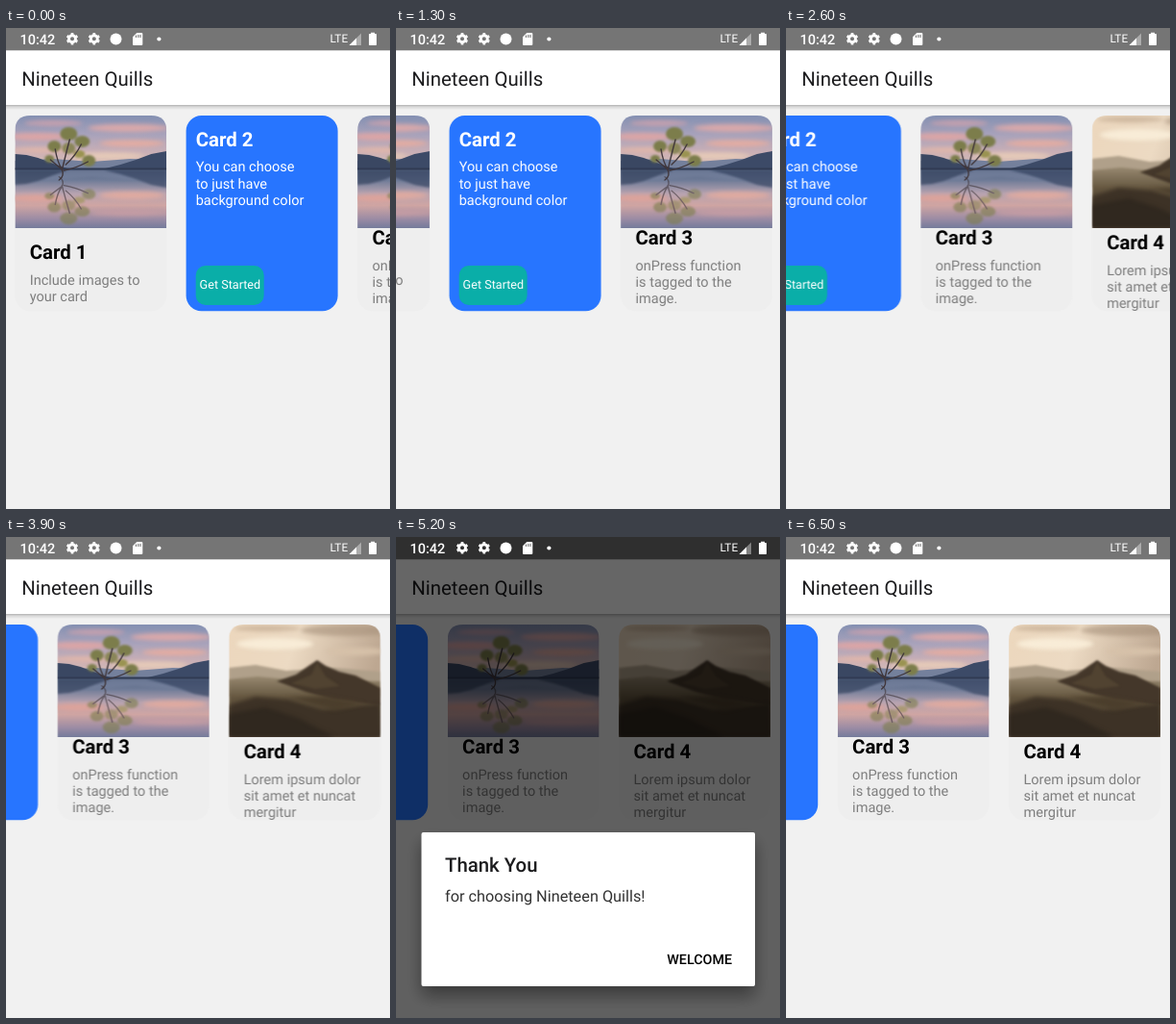
Write an HTML page that moves like this. It is 400 px wide and 500 px high and loops after 7800 ms.

```html
<!DOCTYPE html>
<html lang="en">
<head>
<meta charset="utf-8">
<title>Card carousel</title>
<style>
  html, body { margin: 0; width: 100%; height: 100%; overflow: hidden; background: #f1f1f1; }
  svg { display: block; width: 100vw; height: 100vh; }
  text { font-family: Roboto, sans-serif; text-rendering: geometricPrecision; white-space: pre; }
  .app { font-size: 20.4px; fill: #1c1c1e; }
  .title { font-size: 20.4px; font-weight: 700; }
  .body { font-size: 14.55px; fill: #7e7e7e; }
  .light { fill: #fff; }
  .button { font-size: 12.64px; fill: #fff; }
  .medium { font-weight: 500; }
  .soft { filter: blur(2px); }
  .hazy { filter: blur(1px); }

  .track { animation: scroll 7.8s step-end infinite; }
  .dialog { visibility: hidden; animation: alert 7.8s step-end infinite; }
  .panel { filter: drop-shadow(0 10px 9px rgba(0, 0, 0, .4)); }
  @keyframes scroll {
    0% { transform: translateX(0); }
    16.6666% { transform: translateX(-132.1px); }
    33.3333% { transform: translateX(-225.8px); }
    50%, 100% { transform: translateX(-312.4px); }
  }
  @keyframes alert {
    0% { visibility: hidden; }
    66.6666% { visibility: visible; }
    83.3333%, 100% { visibility: hidden; }
  }
</style>
</head>
<body>
<svg viewBox="0 0 400 500" preserveAspectRatio="none">
  <defs>
    <linearGradient id="shade" x2="0" y2="1">
      <stop stop-color="#000" stop-opacity=".27"/>
      <stop offset=".4" stop-color="#000" stop-opacity=".1"/>
      <stop offset="1" stop-color="#000" stop-opacity="0"/>
    </linearGradient>
    <linearGradient id="dusk" x2="0" y2="1">
      <stop stop-color="#8490b2"/>
      <stop offset=".35" stop-color="#a9a3bb"/>
      <stop offset=".65" stop-color="#c9afb6"/>
      <stop offset="1" stop-color="#dcc3b4"/>
    </linearGradient>
    <linearGradient id="water" x2="0" y2="1">
      <stop stop-color="#4a5a78"/>
      <stop offset=".2" stop-color="#707c98"/>
      <stop offset=".42" stop-color="#b7a3b0"/>
      <stop offset=".62" stop-color="#cfa5a3"/>
      <stop offset=".85" stop-color="#9a8ba4"/>
      <stop offset="1" stop-color="#747b9b"/>
    </linearGradient>
    <linearGradient id="haze" x2="1" y2=".25">
      <stop stop-color="#ecd7bd"/>
      <stop offset=".45" stop-color="#ecdac3"/>
      <stop offset="1" stop-color="#bda791"/>
    </linearGradient>
    <linearGradient id="moor" x2="0" y2="1">
      <stop stop-color="#978870"/>
      <stop offset=".35" stop-color="#64563f"/>
      <stop offset="1" stop-color="#352b21"/>
    </linearGradient>
    <clipPath id="frame"><path d="M0 117V16Q0 0 16 0H142Q158 0 158 16V117Z"/></clipPath>

    <g id="tree">
      <g class="hazy" fill="#7c7d4b">
        <ellipse cx="41" cy="32" rx="7" ry="6"/>
        <ellipse cx="56" cy="19" rx="9" ry="7"/>
        <ellipse cx="70" cy="27" rx="8" ry="6"/>
        <ellipse cx="77" cy="47" rx="7" ry="6"/>
        <ellipse cx="36" cy="45" rx="5" ry="4"/>
        <ellipse cx="56" cy="34" rx="7" ry="6" fill="#8a8659"/>
        <ellipse cx="67" cy="40" rx="6" ry="4" fill="#9a9352"/>
      </g>
      <path d="M46 67Q52 63 49 56Q44 48 42 35M49 57Q52 44 57 25M51 57Q63 55 76 48M53 51Q63 42 69 30M49 56L37 46"
        fill="none" stroke="#40363a" stroke-width="1.4" stroke-linecap="round"/>
    </g>
    <g id="ridges">
      <path d="M0 47L40 45L80 48L120 45L158 46V55.5H0Z" fill="#74809c"/>
      <path d="M0 40L12 41L24 44L40 50L56 55.5H0Z" fill="#3a4762"/>
      <path d="M92 55.5L110 51L126 46L142 40L158 37V55.5Z" fill="#3c4a67"/>
    </g>
    <g id="lake" clip-path="url(#frame)">
      <rect width="158" height="58" fill="url(#dusk)"/>
      <g class="soft">
        <ellipse cx="24" cy="22" rx="32" ry="4" fill="#dba5a6"/>
        <ellipse cx="40" cy="8" rx="30" ry="3" fill="#c4a0ae"/>
        <ellipse cx="118" cy="13" rx="42" ry="4" fill="#d9a8aa"/>
        <ellipse cx="122" cy="29" rx="34" ry="3.5" fill="#e3aca2"/>
        <ellipse cx="30" cy="36" rx="34" ry="3" fill="#dfb6ab"/>
        <ellipse cx="95" cy="42" rx="40" ry="3.5" fill="#e6cab8"/>
      </g>
      <rect y="55" width="158" height="62" fill="url(#water)"/>
      <use href="#ridges"/>
      <g class="hazy" opacity=".75"><use href="#ridges" transform="matrix(1 0 0 -1 0 112)"/></g>
      <rect y="54.5" width="158" height="2" fill="#303b53"/>
      <g class="soft">
        <ellipse cx="22" cy="86" rx="28" ry="4" fill="#dca39b"/>
        <ellipse cx="122" cy="83" rx="34" ry="4" fill="#dfaaa0"/>
        <ellipse cx="120" cy="101" rx="40" ry="3" fill="#c59ca4"/>
      </g>
      <g opacity=".6"><use href="#tree" transform="matrix(1 0 0 -.9 0 124)"/></g>
      <use href="#tree"/>
    </g>
    <g id="hills" clip-path="url(#frame)">
      <rect width="158" height="117" fill="url(#haze)"/>
      <g class="soft">
        <ellipse cx="125" cy="6" rx="50" ry="6" fill="#a58f7a" opacity=".6"/>
        <ellipse cx="40" cy="4" rx="34" ry="3" fill="#b9a088" opacity=".6"/>
        <ellipse cx="48" cy="20" rx="40" ry="6" fill="#f8ecd7"/>
        <ellipse cx="132" cy="28" rx="32" ry="4" fill="#d6c1a9"/>
      </g>
      <path class="hazy" d="M0 45L28 42L60 48L110 45L158 49V75H0Z" fill="#b0a08a"/>
      <path class="hazy" d="M0 57L30 54L70 58L158 59V117H0Z" fill="url(#moor)"/>
      <path class="hazy" d="M50 59L70 52L83 43L92 37L101 43L115 49L132 53L158 66V84L110 78L80 70Z" fill="#44372a"/>
      <path class="hazy" d="M92 39L86 52L65 61L90 67L116 64L101 54Z" fill="#514331"/>
      <path class="soft" d="M0 84L28 75L62 78L98 89L158 82V117H0Z" fill="#3d3226"/>
      <path class="soft" d="M0 93L38 86L72 97L110 117H0Z" fill="#30281f"/>
      <path class="soft" d="M62 76L102 75L140 82L111 89Z" fill="#4b3e2c"/>
    </g>
    <g id="gear" fill="none" stroke="#fff">
      <circle r="3.5" stroke-width="2.9"/>
      <circle r="5.3" stroke-width="1.8" pathLength="12" stroke-dasharray="1 1" stroke-dashoffset="-.5"/>
    </g>
    <rect id="card" y="91" width="158" height="203.2" rx="16"/>
  </defs>

  <rect width="400" height="500" fill="#f1f1f1"/>

  <g class="track">
    <g transform="translate(9.3)">
      <use href="#card" fill="#eeeeee"/>
      <use href="#lake" y="91"/>
      <text class="title" x="15.4" y="240">Card 1</text>
      <text class="body"><tspan x="15.4" y="266.5">Include images to</tspan><tspan x="15.4" y="283.6">your card</tspan></text>
    </g>
    <g transform="translate(187.6)">
      <use href="#card" fill="#2775ff"/>
      <text class="title light" x="10.1" y="123">Card 2</text>
      <text class="body light"><tspan x="10.1" y="149.4">You can choose</tspan><tspan x="10.1" y="166.5">to just have</tspan><tspan x="10.1" y="183.6">background color</tspan></text>
      <rect x="10.1" y="247" width="71" height="41" rx="10" fill="#0aaea8"/>
      <text class="button" x="45.8" y="271.3" text-anchor="middle">Get Started</text>
    </g>
    <g transform="translate(366.1)">
      <use href="#card" fill="#eeeeee"/>
      <use href="#lake" y="91"/>
      <text class="title" x="15.4" y="225.3">Card 3</text>
      <text class="body"><tspan x="15.4" y="251.6">onPress function</tspan><tspan x="15.4" y="268.7">is tagged to the</tspan><tspan x="15.4" y="285.8">image.</tspan></text>
    </g>
    <g transform="translate(544.5)">
      <use href="#card" fill="#eeeeee"/>
      <use href="#hills" y="91"/>
      <text class="title" x="15.4" y="230.4">Card 4</text>
      <text class="body"><tspan x="15.4" y="256.6">Lorem ipsum dolor</tspan><tspan x="15.4" y="273.7">sit amet et nuncat</tspan><tspan x="15.4" y="290.8">mergitur</tspan></text>
    </g>
  </g>

  <rect y="80" width="400" height="5" fill="url(#shade)"/>
  <rect y="23" width="400" height="57" fill="#fff"/>
  <text class="app" x="16.3" y="60">Nineteen Quills</text>
  <rect width="400" height="23.3" fill="#757575"/>

  <g class="dialog">
    <rect width="400" height="500" opacity=".6"/>
    <rect class="panel" x="26.5" y="307" width="347.5" height="160" rx="2" fill="#fff"/>
    <text class="app medium" x="51" y="347.5">Thank You</text>
    <text x="51" y="378.7" font-size="16.3" fill="#333">for choosing Nineteen Quills!</text>
    <text class="medium" x="350" y="444" font-size="14.3" text-anchor="end">WELCOME</text>
  </g>

  <g fill="#fff">
    <text class="medium" x="14.5" y="16.6" font-size="14.5">10:42</text>
    <use href="#gear" x="69" y="11.3"/>
    <use href="#gear" x="91.8" y="11.3"/>
    <circle cx="114.5" cy="11.4" r="6"/>
    <path d="M136.3 5H141.2Q142.3 5 142.3 6V17Q142.3 18 141.2 18H133Q132 18 132 17V9.3Z"/>
    <path d="M135.5 7.5V10M137.8 7V10M140 7V10" stroke="#777" stroke-width="1.1"/>
    <circle cx="159.4" cy="11.5" r="2.1"/>
    <text x="337.6" y="15.4" font-size="11.8">LTE</text>
    <path d="M357.5 18L370 5.5V18Z" opacity=".4"/>
    <path d="M357.5 18L365 10.5V18Z"/>
    <path d="M380 6V4.8H384V6H385.3Q386 6 386 6.8V17.2Q386 18 385.3 18H378.7Q378 18 378 17.2V6.8Q378 6 378.7 6Z"/>
  </g>
</svg>
</body>
</html>
```
